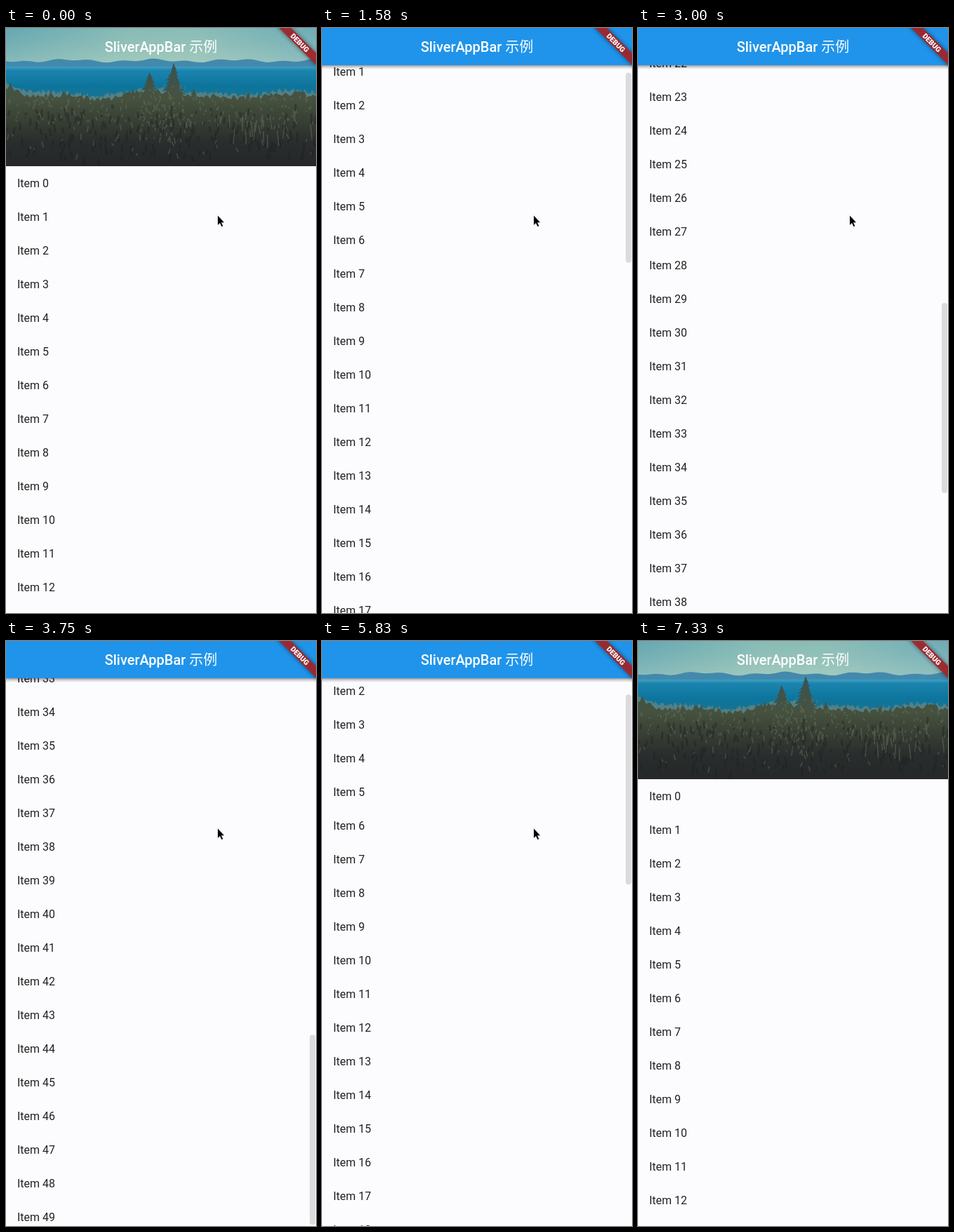
Animation, 442 px wide and 834 px high, one loop 7580 ms. Source, as an HTML page:

```html
<!DOCTYPE html>
<html lang="zh">
<head>
<meta charset="utf-8">
<title>SliverAppBar 示例</title>
<style>
  html, body { margin: 0; width: 100%; height: 100%; overflow: hidden; background: #fcfcfe; }
  #stage { display: block; width: 442px; height: 834px; font-family: Roboto, "Noto Sans CJK SC", "Noto Sans CJK", sans-serif; }
  #list { font-size: 16px; fill: #222; }
  #title { font-size: 20px; font-weight: 500; fill: #fff; text-anchor: middle; }
  #debug { font-size: 10.2px; font-weight: 900; fill: #fff; text-anchor: middle; }
  #thumb { fill: #dedede; mix-blend-mode: multiply; }
</style>
</head>
<body>
<svg id="stage" viewBox="0 0 442 834">
  <defs>
    <linearGradient id="sky" x1="0" x2="1" y1="0" y2="0">
      <stop offset="0" stop-color="#6aa9b2"/>
      <stop offset=".4" stop-color="#a3cbb8"/>
      <stop offset=".62" stop-color="#a6ccba"/>
      <stop offset="1" stop-color="#78b0ba"/>
    </linearGradient>
    <linearGradient id="haze" x1="0" x2="0" y1="0" y2="1">
      <stop offset="0" stop-color="#5ea3b0" stop-opacity=".4"/>
      <stop offset="1" stop-color="#abcfc4" stop-opacity=".6"/>
    </linearGradient>
    <linearGradient id="sea" x1="0" x2="0" y1="0" y2="1">
      <stop offset="0" stop-color="#3fa0c4"/>
      <stop offset=".1" stop-color="#1b84ae"/>
      <stop offset=".5" stop-color="#0d759c"/>
      <stop offset="1" stop-color="#1f7088"/>
    </linearGradient>
    <linearGradient id="wood" gradientUnits="userSpaceOnUse" x1="0" x2="0" y1="60" y2="197">
      <stop offset="0" stop-color="#3c5350"/>
      <stop offset=".3" stop-color="#46523f"/>
      <stop offset=".55" stop-color="#363d33"/>
      <stop offset=".75" stop-color="#2a2d2c"/>
      <stop offset="1" stop-color="#25272a"/>
    </linearGradient>
    <linearGradient id="shade" x1="0" x2="0" y1="0" y2="1">
      <stop offset="0" stop-color="#000" stop-opacity=".4"/>
      <stop offset=".4" stop-color="#000" stop-opacity=".18"/>
      <stop offset="1" stop-color="#000" stop-opacity="0"/>
    </linearGradient>
    <filter id="soft" x="-20%" y="-100%" width="140%" height="300%">
      <feGaussianBlur stdDeviation="3"/>
    </filter>
  </defs>

  <rect width="442" height="834" fill="#fcfcfe"/>
  <g id="list"></g>

  <rect id="shadow" y="53" width="442" height="6" fill="url(#shade)"/>
  <svg id="head" width="442" height="197" overflow="hidden">
    <rect width="442" height="197" fill="#2094ea"/>
    <g id="photo">
      <rect y="-3" width="442" height="62" fill="url(#sky)"/>
      <rect y="-3" width="442" height="62" fill="url(#haze)"/>
      <path id="hills" fill="#4389ac"/>
      <rect y="55" width="442" height="56" fill="url(#sea)"/>
      <path id="brush" fill="#6a8481" opacity=".75"/>
      <path id="forest" fill="url(#wood)"/>
      <path id="firs" fill="url(#wood)"/>
      <path id="dark" fill="none" stroke="#1b2022" stroke-width="3" opacity=".4"/>
      <path id="light" fill="none" stroke="#75836c" stroke-width="1.5" opacity=".4"/>
    </g>
  </svg>
  <text id="title" x="221" y="34">SliverAppBar 示例</text>

  <rect id="thumb" x="433" width="8" height="271" rx="4"/>

  <g transform="translate(443 -3) rotate(45)">
    <rect x="-40" y="28" width="80" height="12" fill="#000" opacity=".5" filter="url(#soft)"/>
    <rect x="-40" y="28" width="80" height="12" fill="#a4272c" opacity=".92"/>
    <text id="debug" x="0" y="37.6">DEBUG</text>
  </g>

  <path id="cursor" d="M302 267.5v13.2l3-2.8 2.4 5.2 1.9-.9-2.3-5h4z"
        fill="#000" stroke="#f4f4f4" stroke-width="1.8" paint-order="stroke"/>
</svg>
<script>
const LOOP = 7580, TICK = 1000 / 12, COLLAPSE = 144;
const $ = id => document.getElementById(id);
const clamp = (v, lo = 0, hi = 1) => Math.min(hi, Math.max(lo, v));

// Scroll offset by tick
const SCROLL = [[4, 0], [5, 5], [13, 95], [28, 482], [35, 1120], [41, 1690], [42, 1690],
  [43, 1706], [45, 1752], [46, 1763], [48, 1763], [49, 1705], [58, 890], [70, 246], [77, 0]];

// Monotone cubic through the points
const slopes = SCROLL.slice(1).map(([x, y], i) => (y - SCROLL[i][1]) / (x - SCROLL[i][0]));
const tangents = SCROLL.map((_, i) => {
  const a = slopes[i - 1] || 0, b = slopes[i] || 0;
  return a * b > 0 ? 2 * a * b / (a + b) : 0;
});
function scrollAt(k) {
  const last = SCROLL.length - 1;
  if (k <= SCROLL[0][0] || k >= SCROLL[last][0]) return 0;
  const i = SCROLL.findIndex(p => p[0] > k) - 1;
  const [x0, y0] = SCROLL[i], [x1, y1] = SCROLL[i + 1];
  const w = x1 - x0, u = (k - x0) / w, v = 1 - u;
  return y0 * (1 + 2 * u) * v * v + y1 * u * u * (3 - 2 * u)
    + w * u * v * (tangents[i] * v - tangents[i + 1] * u);
}

let seed = 11;
const rnd = (lo, hi) => {
  seed = (seed * 16807) % 2147483647;
  return lo + (hi - lo) * seed / 2147483647;
};

function ridge(step, bottom, heightAt) {
  let d = `M0 ${bottom}`;
  for (let x = 0; x <= 442 + step; x += step) d += `L${x} ${heightAt(x).toFixed(1)}`;
  return d + `V${bottom}Z`;
}

function fir(x, top, base, half) {
  const left = [], right = [];
  const n = Math.round((base - top) / 5);
  for (let i = 1; i <= n; i++) {
    const y = top + (base - top) * i / n, w = half * i / n;
    left.push(`${x - w * rnd(.75, 1.2)} ${y} ${x - w * .6} ${y - 1}`);
    right.push(`${x + w * .6} ${y - 1} ${x + w * rnd(.75, 1.2)} ${y}`);
  }
  return `M${x} ${top}L${left.join(' ')} ${right.reverse().join(' ')}Z`;
}

function strokes(n, x0, x1, y0, y1, len) {
  let d = '';
  for (let i = 0; i < n; i++)
    d += `M${rnd(x0, x1).toFixed(1)} ${rnd(y0, y1).toFixed(1)}l${rnd(-3, 3).toFixed(1)} ${rnd(len / 3, len).toFixed(1)}`;
  return d;
}

function paintPhoto() {
  const canopy = x => 97 - 16 * Math.exp(-x / 40) - 10 * Math.exp(-(((x - 220) / 45) ** 2))
    - 5 * clamp((x - 300) / 100) + 2 * Math.sin(x / 17);
  $('hills').setAttribute('d', ridge(6, 55, x => 46.5 + 1.6 * Math.sin(x / 19) + 1.3 * Math.sin(x / 7.3 + 1)));
  $('brush').setAttribute('d', ridge(2, 130, x => canopy(x) - 1 + rnd(-4, 3)));
  $('forest').setAttribute('d', ridge(3, 197, x => canopy(x) + 3 + rnd(-4, 4)));
  $('firs').setAttribute('d', fir(205, 63, 130, 29) + fir(239, 50, 130, 31)
    + fir(181, 86, 125, 16) + fir(268, 86, 125, 16) + fir(6, 78, 120, 18) + fir(345, 91, 125, 14));
  $('dark').setAttribute('d', strokes(190, 0, 442, 108, 185, 14));
  $('light').setAttribute('d', strokes(170, 0, 442, 96, 135, 6)
    + strokes(60, 190, 258, 80, 160, 6) + strokes(50, 0, 442, 125, 180, 9)
    + strokes(24, 300, 440, 115, 155, 24));
}

for (let i = 0; i < 50; i++) {
  const row = document.createElementNS('http://www.w3.org/2000/svg', 'text');
  row.setAttribute('x', 16);
  row.setAttribute('y', 227 + 48 * i);
  row.textContent = `Item ${i}`;
  $('list').append(row);
}
paintPhoto();

function draw(t) {
  const k = Math.floor((t + 4) / TICK);
  const s = Math.round(scrollAt(k));
  const fold = clamp(s / COLLAPSE);
  const fadeFrom = 1 - 56 / COLLAPSE;
  $('list').setAttribute('transform', `translate(0 ${-s})`);
  $('head').setAttribute('height', 197 - COLLAPSE * fold);
  $('photo').setAttribute('transform', `translate(0 ${-COLLAPSE / 4 * fold})`);
  $('photo').setAttribute('opacity', 1 - clamp((fold - fadeFrom) / (1 - fadeFrom)));
  $('shadow').setAttribute('opacity', fold < 1 ? 0 : 1);
  $('thumb').setAttribute('y', s * .322 - 3);
  $('thumb').style.opacity = Math.min(clamp((k - 4) / 4), clamp((88 - k) / 6));
  $('cursor').setAttribute('opacity', k < 86 ? 1 : 0);
}

const start = performance.now();
function loop() {
  draw((performance.now() - start) % LOOP);
  requestAnimationFrame(loop);
}
loop();
</script>
</body>
</html>
```
